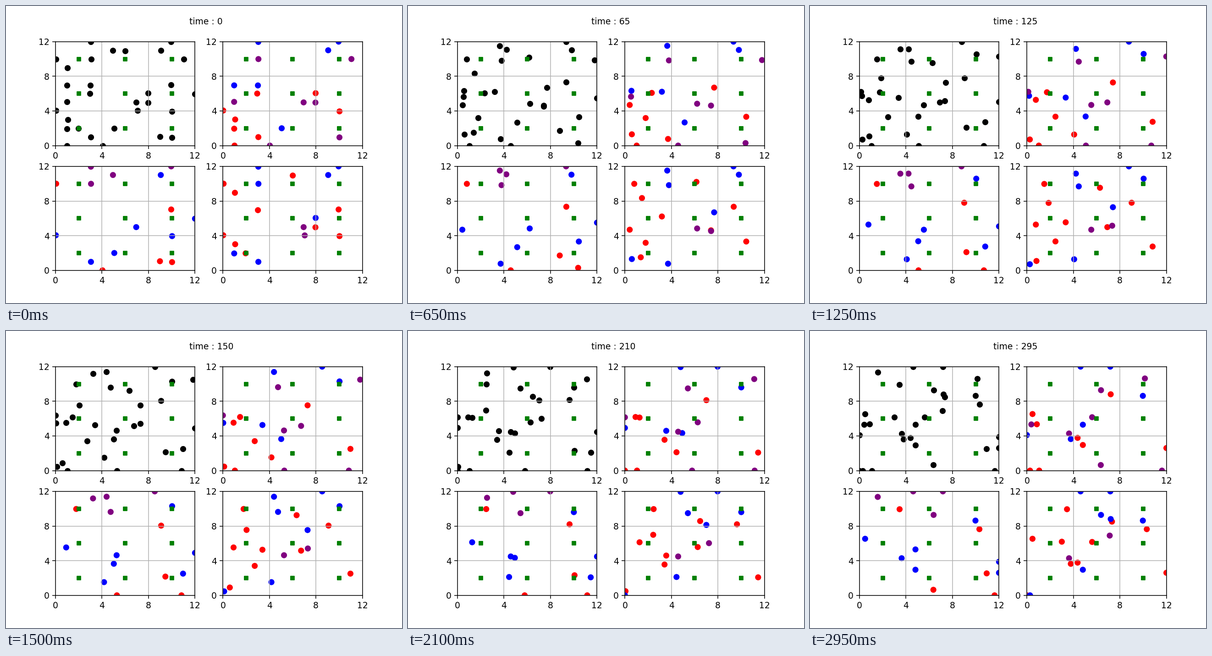
A matplotlib script for the animation above (3 s loop, 864x648 px).

```python
import numpy as np
import matplotlib.pyplot as plt
from matplotlib.animation import FuncAnimation

SIZE = 12
FRAMES, INTERVAL, TIME_STEP = 60, 50, 5
SPEED = 0.0115
COLORS = {"r": "red", "b": "blue", "p": "purple"}
TIMES = np.arange(FRAMES) * TIME_STEP

groups, paths = [], []


def walk(tags, x, y, heading, *bends, pace=1):
    """Send a walker off from (x, y) at a steady speed, sliding along the walls.

    tags: its colour in panels 2-4, '-' where absent.
    bends: (start time, end time, new heading), headings in degrees.
    """
    keys = [(0, heading)]
    for start, end, turned in bends:
        keys += [(start, keys[-1][1]), (end, turned)]
    angles = np.radians(np.interp(TIMES, *zip(*keys)))
    steps = SPEED * pace * TIME_STEP * np.column_stack([np.cos(angles), np.sin(angles)])
    pos, path = np.array([x, y], float), []
    for step in steps:
        pos = np.clip(pos + step, 0, SIZE)
        path.append(pos)
    groups.append(tags)
    paths.append(path)


# straight walkers
walk("--r", 1, 9, -54.5)
walk("-rr", 0, 10, -1)
walk("ppb", 3, 10, -12)
walk("-p-", 5, 11, 174)
walk("bpb", 10, 12, 145)
walk("b--", 1, 7, -123)
walk("b-r", 3, 7, -77)
walk("r-r", 1, 3, 13)
walk("--r", 2, 2, -142)
walk("r--", 1, 0, -89)
walk("pbp", 7, 5, -168)
walk("-b-", 12, 6, -38)
walk("pr-", 10, 1, -62)

# turning walkers
walk("bpb", 3, 12, -37, (115, 135, 55), (245, 255, 140))
walk("--r", 6, 11, -79, (222, 234, 9))
walk("bbb", 9, 11, 3, (83, 93, -92))
walk("p--", 11, 10, -9, (70, 163, 176))
walk("r--", 3, 6, 173, (200, 215, 266), pace=.86)
walk("p--", 1, 5, 126, (125, 275, 320))
walk("rbr", 0, 4, 59, (205, 245, 168))
walk("r-b", 1, 2, -120, (220, 285, -45))
walk("pr-", 4, 0, -44, (225, 235, 58))
walk("rbb", 3, 1, -22, (52, 92, 66), pace=.94)
walk("bb-", 5, 2, 0, (0, 25, 97))
walk("--p", 7, 4, 38, (38, 62, 97), pace=.9)
walk("r-b", 8, 6, 115, (250, 260, 32), pace=.95)
walk("p-r", 8, 5, 220, (45, 85, 138), pace=.9)
walk("-rr", 10, 7, 152, (80, 225, -41), pace=.9)
walk("rbr", 10, 4, -57, (180, 230, 36))
walk("-r-", 9, 1, 106, (65, 110, 14), pace=.92)

tracks = np.array(paths).swapaxes(0, 1)


def members(panel):
    """Walker indices and colours of one panel, red below blue below purple."""
    if panel == 0:
        return list(range(len(groups))), "black"
    tags = [group[panel - 1] for group in groups]
    ids = [i for key in COLORS for i, tag in enumerate(tags) if tag == key]
    return ids, [COLORS[tags[i]] for i in ids]


fig, axes = plt.subplots(2, 2, figsize=(6.4, 4.8), dpi=135)
posts = np.meshgrid([2, 6, 10], [2, 6, 10])
dots = []

for panel, ax in enumerate(axes.flat):
    ids, colors = members(panel)
    dots.append((ids, ax.scatter(*tracks[0, ids].T, c=colors)))
    ax.scatter(*posts, s=20, c="green", marker="s")
    ax.set(xlim=(0, SIZE), ylim=(0, SIZE),
           xticks=range(0, SIZE + 1, 4), yticks=range(0, SIZE + 1, 4))
    ax.grid(True)

clock = axes[0, 0].text(11.5, 14, "time : 0")


def update(frame):
    for ids, dot in dots:
        dot.set_offsets(tracks[frame, ids])
    clock.set_text(f"time : {TIMES[frame]}")
    return [clock] + [dot for _, dot in dots]


anim = FuncAnimation(fig, update, frames=FRAMES, interval=INTERVAL, repeat=True)
plt.show()
```
